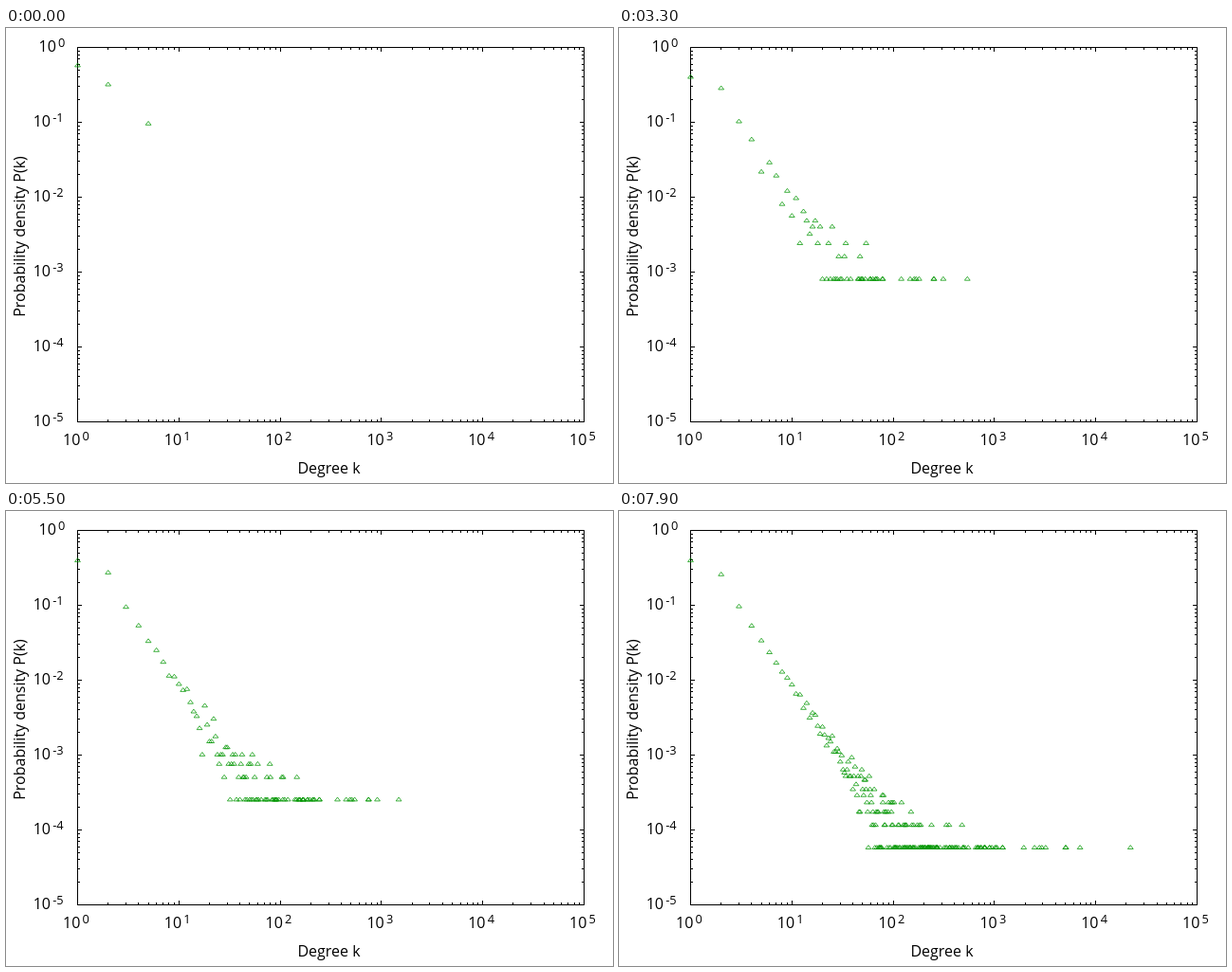
These frames come from a looping animation (640x480 px, 8 s). An HTML page:

```html
<!DOCTYPE html>
<html lang="en">
<head>
<meta charset="utf-8">
<title>Degree distribution</title>
<style>
  html, body { margin: 0; width: 100%; height: 100%; overflow: hidden; background: #fff; }
  svg { display: block; width: 640px; height: 480px; }
  text { font: 16px "Open Sans", "Noto Sans", sans-serif; fill: #000; }
  .sup { font-size: 12.8px; }
  .mid { text-anchor: middle; }
  path { fill: none; stroke: #000; stroke-width: 1; }
  #marks { stroke: #009600; stroke-width: .75; }
</style>
</head>
<body>
<svg viewBox="0 0 640 480">
  <path id="axes"/>
  <g id="labels"></g>
  <text class="mid" x="340.5" y="470">Degree k</text>
  <text class="mid" transform="translate(19.5 220) rotate(-90)">Probability density P(k)</text>
  <path id="marks"/>
</svg>
<script>
const LEFT = 75.5, RIGHT = 609.5, TOP = 20.5, BOTTOM = 415.5;
const DX = 106.8, DY = 79;
const LOOP = 8000, STEP = 100;
const DENSITY = 0.85;  // P(k) = DENSITY / k² from degree 3 on
const SPREAD = 120;    // how far chance moves a node in the ranking

// time, number of nodes, degree of the largest hub
const growth = [
  [0, 31, 5], [900, 210, 23], [1600, 429, 198], [2700, 876, 514], [3300, 1227, 540],
  [4200, 2506, 1050], [5400, 3730, 1330], [6500, 5664, 3000], [7200, 6960, 4080],
  [7900, 17040, 22000]
];
const seedNetwork = new Map([[1, 18], [2, 10], [5, 3]]);

function randoms(count, seed) {
  return Array.from({ length: count }, () => {
    seed = (seed * 1664525 + 1013904223) % 2 ** 32;
    return seed / 2 ** 32;
  });
}
const luck = randoms(6000, 7);

function sizeAt(t) {
  const i = Math.max(1, growth.findIndex(g => g[0] >= t));
  const a = growth[i - 1], b = growth[i];
  const u = (t - a[0]) / (b[0] - a[0]);
  return [1, 2].map(n => Math.round(a[n] + (b[n] - a[n]) * u));
}

// number of nodes for each degree
function tally(nodes, hub) {
  const leaves = 0.4 + 0.18 / (1 + (nodes / 220) ** 2);
  const pairs = 0.325 - 0.0235 * Math.log10(nodes / 31);
  const counts = new Map([[1, Math.round(nodes * leaves)], [2, Math.round(nodes * pairs)]]);

  const mass = DENSITY * nodes;
  for (let rank = 0; rank < mass / 2.5 + SPREAD / 2; rank++) {
    const shift = (luck[rank] - 0.5) * Math.min(rank, SPREAD);
    const k = Math.round(mass / (mass / hub + rank + shift));
    if (k > 2) counts.set(k, (counts.get(k) || 0) + 1);
  }
  return counts;
}

const xOf = k => LEFT + DX * Math.log10(k);
const yOf = p => TOP - DY * Math.log10(p);
const triangle = (x, y) =>
  `M${(x - 2.9).toFixed(1)} ${(y + 1.7).toFixed(1)}l2.9 -3.9l2.9 3.9z`;

function scatter(t) {
  const [nodes, hub] = sizeAt(t);
  const counts = t === 0 ? seedNetwork : tally(nodes, hub);
  return [...counts].map(([k, n]) => triangle(xOf(k), yOf(n / nodes))).join("");
}

function drawAxes() {
  let d = `M${LEFT} ${TOP}H${RIGHT}V${BOTTOM}H${LEFT}Z`;
  let labels = "";
  const snap = v => Math.round(v - 0.5) + 0.5;
  const label = (x, y, power) => {
    labels += `<text x="${x}" y="${y}">10</text>` +
      `<text class="sup" x="${x + 20.5}" y="${y - 5}">${power}</text>`;
  };
  for (let e = 0; e <= 5; e++) {
    for (let m = 1; m <= (e < 5 ? 9 : 1); m++) {
      const len = m === 1 ? 4.5 : 2.5;
      const x = snap(xOf(m * 10 ** e));
      const y = snap(yOf(m * 10 ** (e - 5)));
      d += `M${x} ${BOTTOM}v${-len}M${x} ${TOP}v${len}`;
      d += `M${LEFT} ${y}h${len}M${RIGHT} ${y}h${-len}`;
    }
    label(LEFT + e * DX - 15.5, 440, e);
    label(e ? 28.7 : 34.5, TOP + e * DY + 4.5, e ? -e : 0);
  }
  document.getElementById("axes").setAttribute("d", d);
  document.getElementById("labels").innerHTML = labels;
}

const marks = document.getElementById("marks");
let shown = -1;

function tick(now) {
  const t = Math.floor((now % LOOP) / STEP) * STEP;
  if (t !== shown) {
    marks.setAttribute("d", scatter(t));
    shown = t;
  }
  requestAnimationFrame(tick);
}

drawAxes();
tick(0);
</script>
</body>
</html>
```
